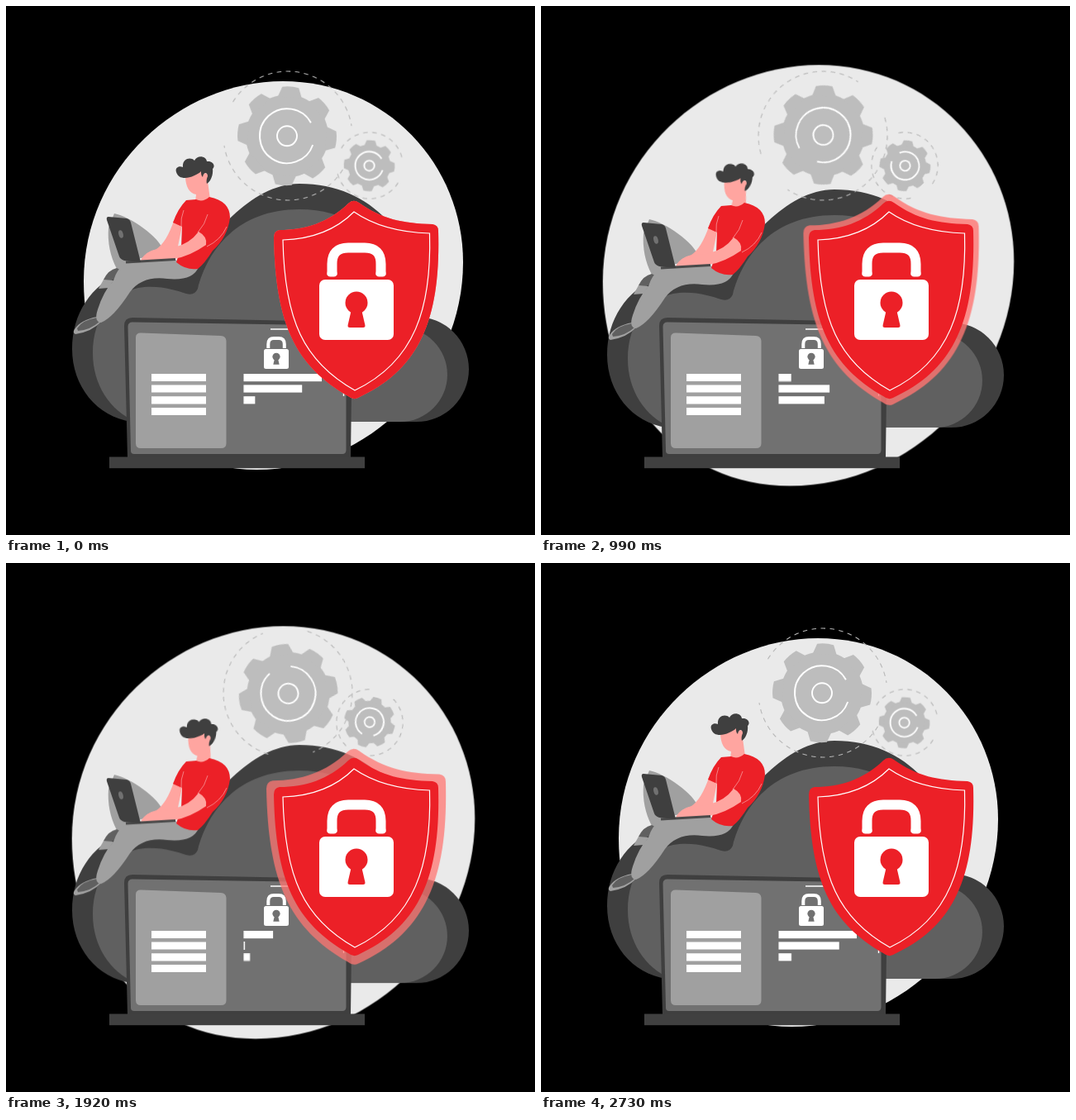
An HTML page without scripts that plays this animation: 640 by 640 pixels, repeating every 2760 ms.

```html
<!DOCTYPE html>
<html lang="en">
<head>
<meta charset="utf-8">
<title>Cloud security</title>
<style>
  html, body { margin: 0; height: 100%; overflow: hidden; background: #000; }
  svg { display: block; width: 100%; height: 100%; }

  :root { --loop: 2760ms; --sine: cubic-bezier(.37, 0, .63, 1); }
  .red { fill: #ec2027; }
  .dark { fill: #3f3f3f; }
  .mid { fill: #606060; }
  .screen { fill: #717171; }
  .pale { fill: #a0a0a0; }
  .skin { fill: #ffa5a0; }
  .white { fill: #fff; }
  .line { fill: none; stroke: #fff; }
  .fixed { vector-effect: non-scaling-stroke; }

  /* moves last 2700 ms, then rest until the loop ends */
  .blob { transform-origin: 324px 326px; animation: swell var(--loop) var(--sine) infinite; }
  .float { animation: float var(--loop) var(--sine) infinite; }
  .head { transform-origin: 229px 243px; animation: nod var(--loop) var(--sine) infinite; }
  .turn { animation: turn var(--loop) linear infinite; }
  .back { animation-name: unturn; }
  .pulse {
    fill: #ff7672;
    transform-origin: 423.7px 356px;
    animation: grow var(--loop) cubic-bezier(.333, 1, .667, 1) infinite,
               fade var(--loop) cubic-bezier(.333, .667, .667, 1) infinite;
  }
  .bar { transform-origin: 287.5px 0; animation: bar1 var(--loop) var(--sine) infinite; }
  .b2 { animation-name: bar2; }
  .b3 { animation-name: bar3; }

  @keyframes swell { 0%, 97.83%, 100% { transform: scale(1); } 48.91% { transform: scale(1.1); } }
  @keyframes float { 0%, 97.83%, 100% { transform: translateY(0); } 48.91% { transform: translateY(8.3px); } }
  @keyframes nod { 0%, 97.83%, 100% { transform: rotate(0); } 48.91% { transform: rotate(9deg); } }
  @keyframes turn { 0% { transform: rotate(0); } 97.83%, 100% { transform: rotate(360deg); } }
  @keyframes unturn { 0% { transform: rotate(0); } 97.83%, 100% { transform: rotate(-360deg); } }
  @keyframes grow {
    0%, .72%, 33.34%, 65.95% { transform: scale(1); }
    33.33%, 65.94%, 98.55%, 100% { transform: scale(1.3); }
  }
  @keyframes fade {
    0%, 32.62%, 65.23% { opacity: 1; }
    32.61%, 65.22%, 97.83%, 100% { opacity: 0; }
  }
  @keyframes bar1 { 0%, 97.83%, 100% { transform: scaleX(1); } 48.91% { transform: scaleX(0); } }
  @keyframes bar2 {
    0% { transform: scaleX(.75); animation-timing-function: cubic-bezier(.33, .67, .67, 1); }
    16.3% { transform: scaleX(1); }
    65.22% { transform: scaleX(0); animation-timing-function: cubic-bezier(.47, 0, .745, .715); }
    89.67% { transform: scaleX(.5); animation-timing-function: linear; }
    100% { transform: scaleX(.808); }
  }
  @keyframes bar3 {
    0% { transform: scaleX(.25); animation-timing-function: linear; }
    8.15% { transform: scaleX(.5); animation-timing-function: cubic-bezier(.39, .575, .565, 1); }
    32.61% { transform: scaleX(1); }
    81.52% { transform: scaleX(0); animation-timing-function: cubic-bezier(.33, 0, .67, .33); }
    100% { transform: scaleX(.313); }
  }
</style>
</head>
<body>
<svg viewBox="0 0 640 640">
  <defs>
    <path id="shield" d="M414 239 Q420 233 427 238 C455 258 480 263 516 264 Q523 265 523 272 C526 380 500 440 426 474 Q420 477 414 472 C350 435 326 385 324 280 Q324 272 331 271 C362 271 390 262 414 239Z"/>
    <path id="tooth" d="M-14.5 -47 L-10 -59 Q0 -61 10 -59 L14.5 -47Z"/>
    <g id="teeth">
      <use href="#tooth"/>
      <use href="#tooth" transform="rotate(90)"/>
      <use href="#tooth" transform="rotate(180)"/>
      <use href="#tooth" transform="rotate(270)"/>
    </g>
    <path id="dashes" class="fixed" d="M-66.5 -40.8 A78 78 0 0 1 77 -12.2" fill="none" stroke="#b6b6b6" stroke-width="1.1" stroke-dasharray="5.5 5.5"/>
    <g id="gear">
      <use href="#dashes"/>
      <use href="#dashes" transform="rotate(180)"/>
      <g transform="translate(-1 .3)">
        <g fill="#bdbdbd">
          <circle r="50"/>
          <use href="#teeth" transform="rotate(4)"/>
          <use href="#teeth" transform="rotate(49)"/>
        </g>
        <g class="line" stroke-width="1.9">
          <path class="fixed" d="M31.2 10.7 A33 33 0 1 1 28.9 -16"/>
          <circle class="fixed" r="12"/>
        </g>
      </g>
    </g>
  </defs>

  <rect width="640" height="640"/>
  <path class="blob" fill="#eaeaea" d="M335 91 C460 91 553 192 553 310 C553 445 440 561 303 561 C178 561 94 458 94 333 C94 195 210 91 335 91Z"/>

  <g class="float">
    <!-- cloud -->
    <path class="dark" d="M152 503 C110 497 80 460 80 415 C80 372 103 338 140 322 C175 310 205 320 225 318 C243 284 295 215 355 215 C400 215 435 232 460 258 L480 376 H496.5 A63.5 63.5 0 0 1 496.5 503Z"/>
    <path class="mid" d="M158 503 C125 490 105 457 105 420 C105 375 130 348 160 341 C185 337 205 344 218 348 Q228 351 232 342 C244 295 280 246 355 246 C410 246 450 275 460 300 L477 389 A57 57 0 0 1 477 503Z"/>

    <!-- legs and shoes -->
    <path class="pale" d="M131 251 C150 255 185 278 191 297 L160 306 L143 320 L134 318 Q122 295 124 268Z"/>
    <path class="mid" d="M118 331 Q124 319 134 317 L142 321 Q133 332 120 334Z"/>
    <path class="pale" d="M112 342 L118 331 L130 332 L124 341Z"/>
    <path class="pale" d="M83 391 Q90 380 110 376 L115 382 Q104 394 84 397 Q80 395 83 391Z"/>
    <path class="mid" d="M86 390 Q92 380 110 377 L113 382 Q102 392 87 393Z"/>
    <path class="pale" d="M140 312 Q170 306 205 307 Q222 318 233 316 Q226 333 195 330 Q165 326 150 346 Q130 377 115 383 Q106 382 111 367 Q118 345 130 332 Q134 318 146 310Z"/>

    <!-- head -->
    <g class="head">
      <path class="skin" d="M217 206 C217 218 222 227 230 228 L229 237 Q239 242 247 234 L244 212 C248 205 242 199 238 204 L236 199Z"/>
      <path class="dark" d="M206 201 C204 195 210 193 214 195 C213 185 223 182 228 187 C231 180 242 181 243 188 C250 187 254 193 250 197 C251 205 247 213 243 215 C242 212 243 208 244 206 C244 201 239 200 238 207 C236 205 236 203 236 200 C230 206 210 214 206 201Z"/>
    </g>

    <!-- arms, shirt, small laptop -->
    <path class="skin" d="M203 260 L213 266 L208 291 L188 304 L164 306 Q170 297 182 294 Q194 286 203 260Z"/>
    <path class="red" d="M230 234 Q238 238 246 231 Q271 236 271 256 Q268 280 250 296 Q240 312 232 318 Q218 320 206 310 L212 292 L213 267 L202 262 Q208 245 218 235Z"/>
    <path class="skin" d="M233 273 Q244 279 242 289 Q222 303 203 306 L163 308 Q166 301 176 296 L203 292 Q222 288 233 273Z"/>
    <path class="line" stroke-opacity=".55" stroke-width=".8" d="M244 252 Q241 264 232 274 M267 267 Q260 283 243 291 M215 247 Q211 257 212 267"/>
    <path d="M145 310 L205 306.5" stroke="#4a4a4a" stroke-width="3"/>
    <path class="dark" d="M124 255 L146 257 Q150 258 151 262 L163 310 L143 308 Q138 306 137 303 L122 259 Q121 255 124 255Z"/>
    <ellipse class="screen" cx="139" cy="276" rx="2.7" ry="4.8" transform="rotate(-15 139 276)"/>
  </g>

  <g transform="translate(341 157)"><use class="turn" href="#gear"/></g>
  <g transform="translate(440 193) scale(.515)"><use class="turn back" href="#gear"/></g>

  <!-- large laptop -->
  <path class="dark" d="M153 377 L410 382 Q419 382 419 391 L417 546 H147 L143 387 Q143 377 153 377Z"/>
  <path class="screen" d="M153 382.5 L405 386.5 Q411 386.5 411.5 392 V537 Q411.5 542 407 542 H155 Q151 542 151 538 L147.5 388 Q147.5 382.5 153 382.5Z"/>
  <rect x="125" y="545.5" width="309" height="13.7" fill="#404040"/>
  <path class="pale" d="M163 395.5 L260 399 Q266 399.5 266.5 405 V529 Q266.5 535 260 535 H163 Q157 535 157 529 V401 Q157 395.5 163 395.5Z"/>
  <path class="line" stroke-width="9.2" d="M176 449.5 H242 M176 463 H242 M176 476.8 H242 M176 490.5 H242"/>
  <path class="line" stroke-width="1.4" d="M320 391 H350 M408.5 460 V472"/>
  <rect class="white" x="312" y="415" width="30" height="24" rx="2.5"/>
  <path class="line" stroke-width="4" d="M317.3 414 V409 Q317.3 402 324 402 H330 Q336.8 402 336.8 409 V414"/>
  <path class="screen" d="M325 426.5 L323.3 433.8 H330.7 L329 426.5Z"/>
  <circle class="screen" cx="327" cy="424.3" r="4.6"/>
  <g class="white">
    <rect class="bar" x="287.5" y="445" width="94.5" height="9.2"/>
    <rect class="bar b2" x="287.5" y="458.4" width="94.5" height="9.2"/>
    <rect class="bar b3" x="287.5" y="472.2" width="56" height="9.2"/>
  </g>

  <!-- shield -->
  <use class="pulse" href="#shield"/>
  <use class="red" href="#shield"/>
  <path class="line" stroke-width="1.2" d="M421 249 C447 267 478 274 512.5 275 C515 365 495 430 422 465 C360 430 337 380 335 283 C370 282 398 272 421 249Z"/>
  <rect class="white" x="379" y="331" width="90" height="73" rx="7"/>
  <path class="line" stroke-width="12" d="M394.5 325.5 V312 Q394.5 292.5 414 292.5 H434 Q453.5 292.5 453.5 312 V325.5"/>
  <path class="line" stroke-width="8" stroke-linecap="round" d="M392.5 323.5 H396.5 M451.5 323.5 H455.5"/>
  <circle class="red" cx="424" cy="359" r="13.5"/>
  <path class="red" d="M418 367 L413.6 386 Q413 389 416 389 H432 Q435 389 434.4 386 L430 367Z"/>
</svg>
</body>
</html>
```
